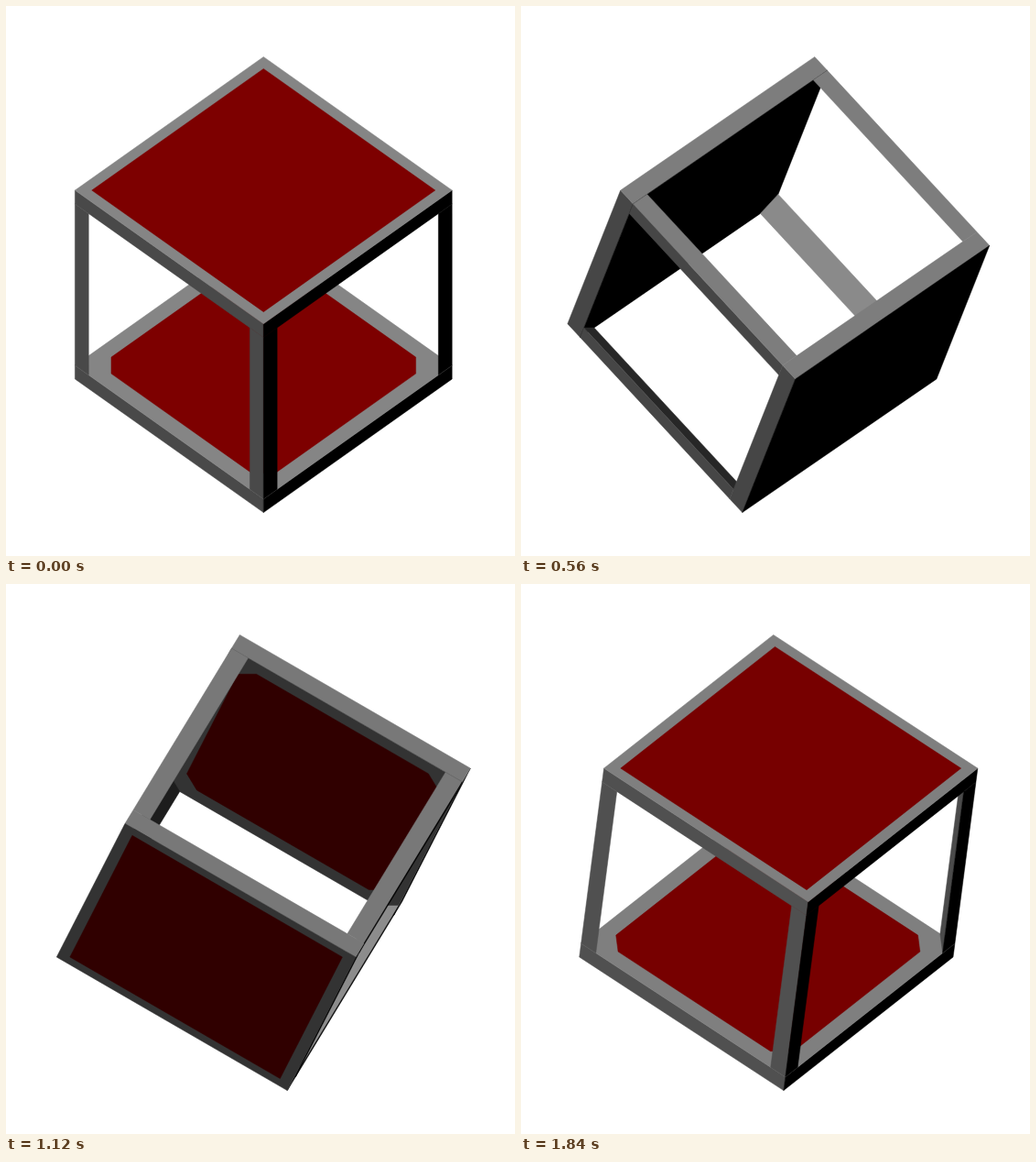
Recreate the animation shown at these times as an HTML page with a canvas. Size 556x600 px, loop 1.88 s.

```html
<!DOCTYPE html>
<html>
<head>
<meta charset="utf-8">
<title>Turning cube</title>
<style>
html, body { margin: 0; width: 100%; height: 100%; overflow: hidden; background: #fff; }
canvas { display: block; }
</style>
</head>
<body>
<canvas id="stage" width="556" height="600"></canvas>
<script>
const ctx = document.getElementById('stage').getContext('2d');
const H = 145.6;           // half the cube's edge
const BEAM = 21;           // thickness of slabs and posts
const D = Math.SQRT1_2;
const AXES = [[-D, .5, .5], [D, .5, .5], [0, D, -D]];  // screen x, y down, z to viewer
const LIGHT = [-59, -63, 125];
const SIDES = [[1, 0], [0, 1], [-1, 0], [0, -1]];
let basis;

function turn(angle) {
  const c = Math.cos(angle), s = Math.sin(angle);
  basis = AXES.map(([x, y, z]) => [x * c - z * s, y, x * s + z * c]);
}

// cube coordinates to view coordinates
const view = p => [0, 1, 2].map(i => p.reduce((sum, v, k) => sum + v * basis[k][i], 0));

function face(normal, points, red) {
  const n = view(normal);
  if (n[2] <= 1e-6) return;
  const lit = n.reduce((sum, v, i) => sum + v * LIGHT[i], 0) / Math.hypot(...n);
  const g = Math.round(Math.max(0, lit));
  ctx.fillStyle = ctx.strokeStyle = red ? `rgb(${Math.round(g * .94)},0,0)` : `rgb(${g},${g},${g})`;
  ctx.beginPath();
  for (const p of points) {
    const [x, y] = view(p);
    ctx.lineTo(281.3 + x, 304 + y);
  }
  ctx.closePath();
  ctx.fill();
  ctx.stroke();
}

// square of half size a with cut corners, at height r
function plate(a, cut, r) {
  const b = a - cut;
  return SIDES.flatMap(([x, y]) => [-b, b].map(v => [a * x - v * y, a * y + v * x, r]));
}

// upright quad over the segment from a to b
const wall = (a, b, low, high) => [[...a, low], [...b, low], [...b, high], [...a, high]];

function slab(k) {
  const outer = k * H, inner = k * (H - BEAM);
  for (const [x, y] of SIDES)
    face([x, y, 0], wall([H * (x + y), H * (y - x)], [H * (x - y), H * (y + x)], inner, outer));
  face([0, 0, k], plate(H, 0, outer));
  face([0, 0, k], plate(H - 13, 0, outer), true);
  face([0, 0, -k], plate(H, 0, inner));
  face([0, 0, -k], plate(H - 19, 18, inner), true);
}

// three-sided post in the corner after side (x, y)
function post([x, y]) {
  const h = H - BEAM;
  const at = (u, v) => [u * x - v * y, u * y + v * x];
  const a = at(H, h), b = at(h, H), c = at(H, H);
  face([y - x, -x - y, 0], wall(a, b, -h, h));
  face([x, y, 0], wall(a, c, -h, h));
  face([-y, x, 0], wall(b, c, -h, h));
}

function draw() {
  const step = Math.floor(performance.now() / 40) % 47;
  const degrees = step < 15 ? step * 8 : 120 + (step - 15) * 7.5;
  turn(degrees * Math.PI / 180);
  ctx.fillStyle = '#fff';
  ctx.fillRect(0, 0, 556, 600);
  ctx.lineWidth = .5;
  const near = basis[2][2] > 0 ? 1 : -1;
  const depth = ([x, y]) => view([x - y, x + y, 0])[2];
  slab(-near);
  [...SIDES].sort((a, b) => depth(a) - depth(b)).forEach(post);
  slab(near);
  requestAnimationFrame(draw);
}
draw();
</script>
</body>
</html>
```
